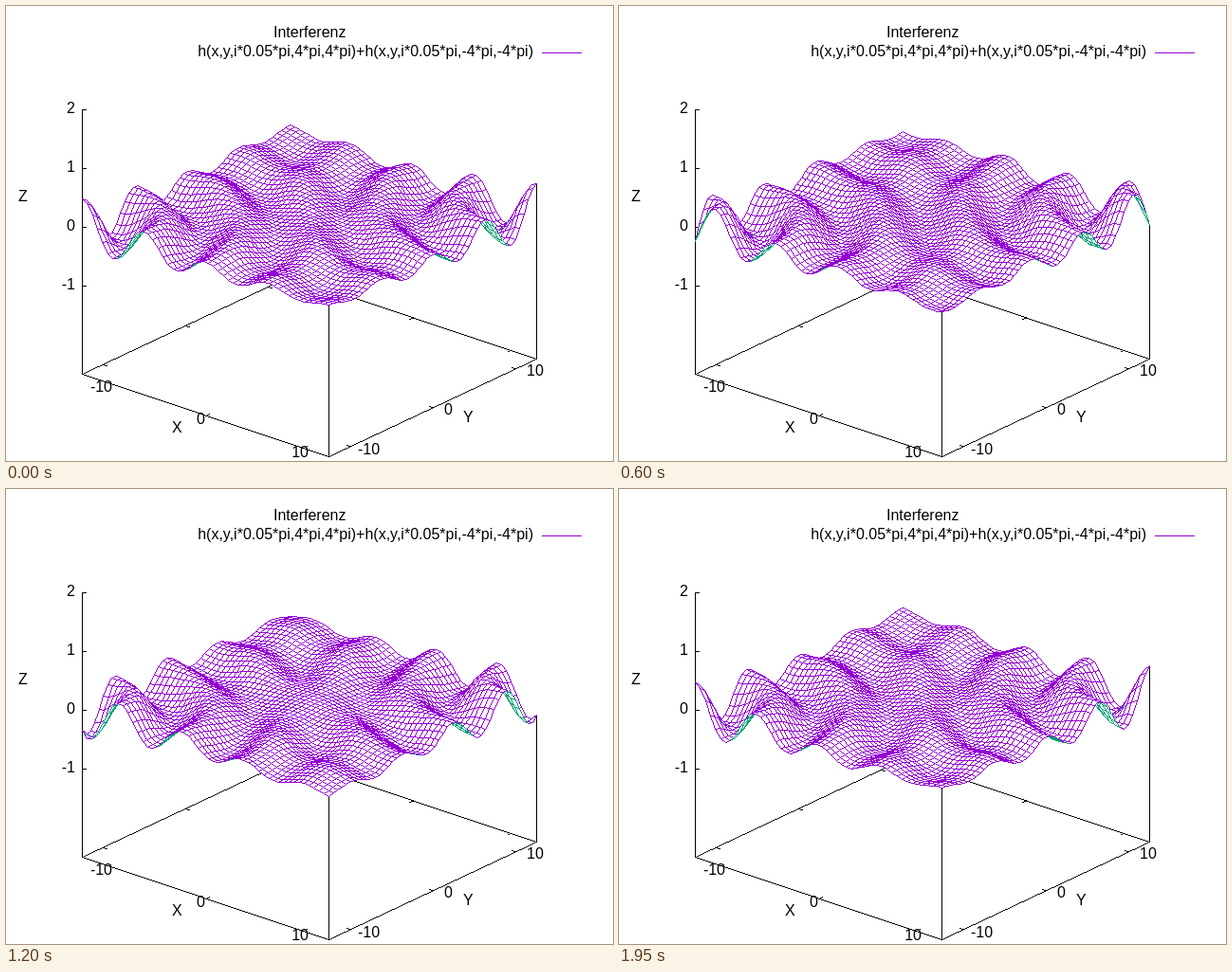
These frames come from a looping animation (640x480 px, 2000 ms). An HTML page with a canvas:

```html
<!DOCTYPE html>
<html lang="de">
<head>
<meta charset="utf-8">
<title>Interferenz</title>
<style>
  html, body { margin: 0; width: 640px; height: 480px; overflow: hidden; background: #fff; }
  canvas, svg { position: absolute; left: 0; top: 0; display: block; }
  text { font: 16px "Liberation Sans", Arial, sans-serif; }
</style>
</head>
<body>
<canvas id="plot" width="640" height="480"></canvas>
<svg id="labels" width="640" height="480"></svg>
<script>
const W = 640, H = 480, N = 49, SIZE = 8 * Math.PI;
const WHITE = 0xffffffff, BLACK = 0xff000000;
const TOP = 0xffd30094, UNDER = 0xff739e00; // ABGR
const ctx = plot.getContext('2d');
const image = ctx.createImageData(W, H);
const pixels = new Uint32Array(image.data.buffer);

// Labels: text, x, baseline, anchor
labels.innerHTML = [
  ['Interferenz', 282, 33, 'start'],
  ['h(x,y,i*0.05*pi,4*pi,4*pi)+h(x,y,i*0.05*pi,-4*pi,-4*pi)', 556, 53, 'end'],
  ['2', 73, 113, 'end'], ['1', 73, 175, 'end'], ['0', 73, 237, 'end'], ['-1', 73, 299, 'end'],
  ['-10', 112, 407, 'end'], ['0', 210, 441, 'end'], ['10', 319, 476, 'end'],
  ['-10', 371, 473, 'start'], ['0', 462, 431, 'start'], ['10', 549, 390, 'start'],
  ['X', 175, 450, 'start'], ['Y', 482, 439, 'start'], ['Z', 13, 206, 'start']
].map(([s, x, y, a]) => `<text x="${x}" y="${y}" text-anchor="${a}">${s}</text>`).join('');

// u and v run 0..1 along the X and Y axes; z = -2.5 is the base plane
const project = (u, v, z) => [
  Math.round(80 + 260.4 * u + 218.6 * v),
  Math.round(233.3 + 86.7 * u - 103.3 * v - 62 * z)
];

function line([x0, y0], [x1, y1], colour) {
  const n = Math.max(Math.abs(x1 - x0), Math.abs(y1 - y0)) || 1;
  for (let i = 0; i <= n; i++) {
    const x = Math.round(x0 + (x1 - x0) * i / n);
    const y = Math.round(y0 + (y1 - y0) * i / n);
    pixels[y * W + x] = colour;
  }
}

const wave = (r, phase) => 0.5 * Math.exp(-0.1 * r) * Math.cos(r - phase);

const height = (u, v, phase) =>
  wave(SIZE * Math.hypot(u, v), phase) + wave(SIZE * Math.hypot(1 - u, 1 - v), phase);

function drawAxes(phase) {
  const base = (u, v) => project(u, v, -2.5);
  const corners = [[0, 0], [1, 0], [1, 1], [0, 1]];
  corners.forEach(([u, v], i) => {
    line(base(u, v), base(...corners[(i + 1) % 4]), BLACK);
    line(base(u, v), project(u, v, height(u, v, phase)), BLACK);
  });
  line([80, 388], [80, 109], BLACK);
  for (let z = -1; z <= 2; z++) line([80, 233 - 62 * z], [84, 233 - 62 * z], BLACK);
  for (const value of [-10, 0, 10]) {
    const f = 0.5 + value / SIZE, d = 0.016;
    line(base(f, 0), base(f, d), BLACK);
    line(base(f, 1), base(f, 1 - d), BLACK);
    line(base(0, f), base(d, f), BLACK);
    line(base(1, f), base(1 - d, f), BLACK);
  }
  line([565, 49], [606, 49], TOP);
}

// y of the line p-q at column x
const lineY = (x, p, q) => p[1] + (q[1] - p[1]) * (x - p[0]) / (q[0] - p[0] || 1);

const chainY = (x, a, b, c) => x < b[0] ? lineY(x, a, b) : lineY(x, b, c);

const cross = (o, p, q) => (p[0] - o[0]) * (q[1] - o[1]) - (p[1] - o[1]) * (q[0] - o[0]);

// A cell is two triangles that share the diagonal left-right
function drawCell(left, front, right, back) {
  for (let x = left[0]; x <= right[0]; x++) {
    const ys = [chainY(x, left, front, right), chainY(x, left, back, right), lineY(x, left, right)];
    const end = Math.max(...ys);
    for (let y = Math.ceil(Math.min(...ys)); y <= end; y++) pixels[y * W + x] = WHITE;
  }
  const backColour = cross(left, right, back) <= 0 ? TOP : UNDER;
  const frontColour = cross(left, right, front) >= 0 ? TOP : UNDER;
  line(left, back, backColour);
  line(back, right, backColour);
  if (backColour !== frontColour) line(left, right, frontColour);
  line(left, front, frontColour);
  line(front, right, frontColour);
}

function draw(phase) {
  pixels.fill(WHITE);
  drawAxes(phase);
  const grid = [];
  for (let i = 0; i <= N; i++) {
    grid[i] = [];
    for (let j = 0; j <= N; j++) {
      grid[i][j] = project(i / N, j / N, height(i / N, j / N, phase));
    }
  }
  // Back to front
  for (let i = 0; i < N; i++) {
    for (let j = N - 1; j >= 0; j--) {
      drawCell(grid[i][j], grid[i + 1][j], grid[i + 1][j + 1], grid[i][j + 1]);
    }
  }
  ctx.putImageData(image, 0, 0);
}

const start = performance.now();
let shown = -1;
function tick() {
  const step = Math.floor((performance.now() - start) % 2000 / 50);
  if (step !== shown) {
    shown = step;
    draw((step + 1) * 0.05 * Math.PI);
  }
  requestAnimationFrame(tick);
}
tick();
</script>
</body>
</html>
```
